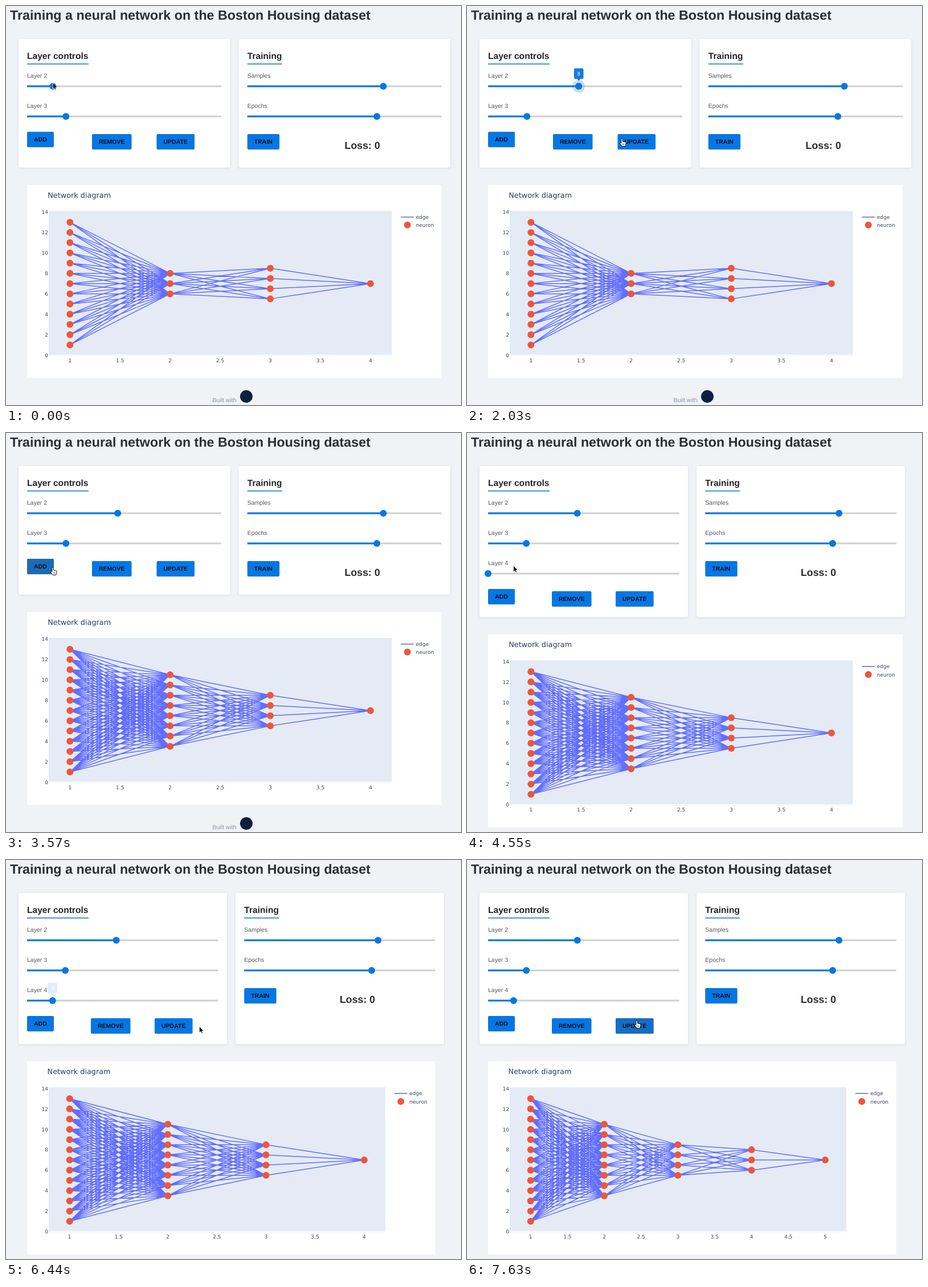
Write an HTML page that moves like this. It is 799 px wide and 701 px high and loops after 8 s.

```html
<!DOCTYPE html>
<html lang="en">
<head>
<meta charset="utf-8">
<title>Training a neural network</title>
<style>
html, body { margin: 0; width: 100%; height: 100%; overflow: hidden; background: #f1f2f6; }
svg { display: block; width: 799px; height: 701px; font: 10.5px "Liberation Sans", Arial, sans-serif; text-rendering: geometricPrecision; }
.card { fill: #fff; filter: drop-shadow(0 1px 2px rgba(60, 70, 100, .13)); }
.title { font-size: 23.3px; font-weight: bold; fill: #2d2e32; }
.head { font-size: 15.6px; font-weight: bold; fill: #232427; }
.label { fill: #55585d; }
.btn { font-weight: bold; fill: #06101f; }
.loss { font-size: 17.8px; font-weight: bold; fill: #2a2b2e; }
.tip { font-size: 9px; fill: #fff; text-anchor: middle; }
.foot { fill: #8c94a3; }
.plot text { font: 9px "DejaVu Sans", Verdana, sans-serif; fill: #3a4660; }
.plot .name { font-size: 12.83px; fill: #2a3f5f; }
.edges { stroke: #636efa; stroke-width: 1.5; fill: none; }
</style>
</head>
<body>
<svg viewBox="0 0 799 701">
  <rect width="799" height="701" fill="#f1f2f6"/>
  <text class="title" x="7" y="24">Training a neural network on the Boston Housing dataset</text>
  <g id="panel"></g>
  <g id="plot" class="plot"></g>
  <g id="cursor"></g>
</svg>
<script>
const LOOP = 8000, STEP = 70;
const BLUE = '#0577e3';
const ADD_LAYER = 4480, RESIZE = 4830;

// time, x, y, shape; a shape holds until the next row
const cursorKeys = [
  [0, 82.5, 134.8, 'arrow'],
  [210, 82.5, 141, 'grab'],
  [1400, 82.5, 141, 'grab'],
  [1820, 196, 141, 'grab'],
  [1890, 212, 168, 'arrow'],
  [2030, 272, 233, 'hand'],
  [2240, 298, 236, 'hand'],
  [3080, 298, 236, 'hand'],
  [3150, 270, 252, 'arrow'],
  [3430, 86, 238, 'hand'],
  [3570, 82, 236, 'hand'],
  [3920, 82, 236, 'hand'],
  [4200, 81.5, 233, 'hand'],
  [ADD_LAYER, 81.5, 233, 'arrow'],
  [5320, 81.5, 233, 'arrow'],
  [5460, 85, 242, 'grab'],
  [5600, 87, 247, 'grab'],
  [6160, 87, 247, 'grab'],
  [6230, 128, 259, 'arrow'],
  [6440, 339.5, 292.5, 'arrow'],
  [6580, 339.5, 292.5, 'arrow'],
  [6860, 304, 264, 'arrow'],
  [7000, 301, 271, 'arrow'],
  [7070, 299, 279, 'hand'],
  [7140, 298, 282, 'hand'],
  [LOOP, 298, 282, 'hand']
];

const shapes = {
  arrow: '<path d="M0 0V11L2.6 8.7 4.3 12.5 6 11.8 4.4 8.1H7.8Z" fill="#000" stroke="#fff" stroke-width=".8"/>',
  hand: '<path d="M-1.2 8V1.2a1.3 1.3 0 0 1 2.6 0V5l4.3.8q1.6.4 1.5 2l-.6 3.2-1 2.6H.2L-3.6 8.6q-.6-1.4 1-1.3Z" fill="#fff" stroke="#111"/>' +
    '<path d="M1.8 8.5v3M3.7 8.5v3" stroke="#111" stroke-width=".7"/>',
  grab: '<path d="M-4 1V-3.5a1.2 1.2 0 0 1 2.3 0V-5A1.2 1.2 0 0 1 .6-5v.7a1.2 1.2 0 0 1 2.3 0v1.5a1.1 1.1 0 0 1 2.2 0V1.5L4 5.5H-2.5L-5.6 1.2q-.5-1.4 1.6-.2Z" fill="#fff" stroke="#111"/>' +
    '<path d="M-1.7-4V-.5M.6-4.5V-.5M2.9-3.5V-.5" stroke="#111" stroke-width=".7"/>'
};

const $ = id => document.getElementById(id);
const lerp = (a, b, p) => a + (b - a) * p;
const ramp = (t, a, b) => Math.min(1, Math.max(0, (t - a) / (b - a)));
const smooth = p => p * p * (3 - 2 * p);
const text = (cls, x, y, s, more = '') => `<text class="${cls}" x="${x}" y="${y}" ${more}>${s}</text>`;
const rect = (x, y, w, h, more) => `<rect x="${x}" y="${y}" width="${w}" height="${h}" ${more}/>`;
const dot = (x, y, r, fill) => `<circle cx="${x}" cy="${y}" r="${r}" fill="${fill}"/>`;

function put(id, html) {
  const el = $(id);
  if (el.last !== html) el.innerHTML = el.last = html;
}

function slider(x, w, y, p, label) {
  const at = x + w * p;
  return text('label', x, y - 14.8, label) +
    rect(x, y - 1.5, w, 3, 'rx="1" fill="#cfd0d2"') +
    rect(x, y - 1.5, w * p, 3, `fill="${BLUE}"`) + dot(at, y, 6, BLUE);
}

function tooltip(x, y, value, alpha) {
  if (alpha <= 0) return '';
  return `<g opacity="${alpha}" transform="translate(${x} ${y})">` +
    dot(0, 0, 11, 'rgba(70,110,200,.25)') + dot(0, 0, 6, BLUE) +
    `<path d="M-6.3-31.5H6.3q2 0 2 2v14.5q0 2-2 2H3L0-9.5-3-13H-6.3q-2 0-2-2V-29.5q0-2 2-2Z" fill="#147ae0"/>` +
    text('tip', 0, -18.6, value) + '</g>';
}

function button(x, y, w, label, hover = 0, press = 0) {
  const ripple = press > 0 && press < 1
    ? rect(x, y, w, 27, `rx="2" fill="#000" opacity="${.12 * (1 - press)}"`) : '';
  return rect(x, y + 1, w, 27, 'rx="2" fill="#000" opacity=".1"') +
    rect(x, y, w, 27, `rx="2" fill="${BLUE}"`) +
    rect(x, y, w, 27, `rx="2" fill="#2366ac" opacity="${hover}"`) + ripple +
    text('btn', x + 12, y + 17.2, label);
}

function heading(x, w, label) {
  return text('head', x, 92.6, label) + rect(x, 101, w, 1.6, 'fill="#1a80cb"');
}

function drawPanel(t) {
  const late = t >= ADD_LAYER;
  const cardW = late ? 366 : 371.5, cardH = late ? 265.5 : 226;
  const trackW = cardW - 30.3, right = late ? 403 : 408.5, rx = right + 15.3;
  const by = late ? 274 : 221;
  const second = lerp(2, 7, smooth(ramp(t, 1400, 1820)));
  const fourth = 2 * smooth(ramp(t, 5740, 6020));
  const addHover = late ? 0 : .8 * ramp(t, 3360, 3570);
  const updHover = t < 3150 ? .55 * ramp(t, 2030, 2310) : late ? .55 * ramp(t, 7070, 7280) : .55 * (1 - ramp(t, 3080, 3290));

  let s = rect(22, 58, cardW, cardH, 'rx="3" class="card"') +
    rect(right, 58, cardW, cardH, 'rx="3" class="card"') +
    heading(37, 108, 'Layer controls') + heading(rx, 61, 'Training') +
    slider(37, trackW, 141, second / 15, 'Layer 2') +
    slider(37, trackW, 194, 3 / 15, 'Layer 3');
  if (late) s += slider(37, trackW, 247, fourth / 15, 'Layer 4');
  s += slider(rx, trackW, 141, .7, 'Samples') + slider(rx, trackW, 194, 2 / 3, 'Epochs') +
    button(37, by, 47, 'ADD', addHover, ramp(t, 3850, 4270)) +
    button(late ? 149 : 151, by + 4, 69.5, 'REMOVE') +
    button(late ? 261 : 264.5, by + 4, 66.6, 'UPDATE', updHover, ramp(t, late ? 7140 : 2450, late ? 7350 : 2870)) +
    button(rx, 225, 56.4, 'TRAIN') +
    text('loss', late ? 586 : 594.6, 251, 'Loss: 0');

  if (t >= 1400 && t < 2500)
    s += tooltip(37 + trackW * second / 15, 141, Math.round(second) + 1, 1 - ramp(t, 2170, 2450));
  if (t >= 5670 && t < 6500)
    s += tooltip(37 + trackW * fourth / 15, 247, Math.round(fourth) + 1, 1 - ramp(t, 6195, 6475));
  if (!late) s += text('foot', 362.5, 695.5, 'Built with') + dot(422, 686, 11, '#0b1f3f');
  put('panel', s);
}

function drawPlot(t) {
  const late = t >= ADD_LAYER, narrow = t >= RESIZE;
  const layers = t < 3080 ? [13, 3, 4, 1] : t < 7560 ? [13, 8, 4, 1] : [13, 8, 4, 3, 1];
  const key = [late, narrow, layers].join();
  if ($('plot').key === key) return;
  $('plot').key = key;

  const dy = late ? 39.4 : 0, dx = narrow ? -11.5 : 0;
  const x1 = narrow ? 111.7 : 112.3, xn = narrow ? 629 : 640;
  const n = layers.length;
  const px = v => x1 + (xn - x1) * (v - 1) / (n - 1);
  const py = v => 613.4 + dy - 17.96 * v;
  const nodes = layers.map((count, l) =>
    Array.from({ length: count }, (_, i) => [px(l + 1), py(7 + i - (count - 1) / 2)]));

  let s = rect(37, 314.4 + dy, 728 + dx, 339, 'fill="#fff"') +
    rect(75, 360 + dy, 602.6 + dx, 254.8, 'fill="#e4ebf5"') +
    rect(75, 612.6 + dy, 602.6 + dx, 1.5, 'fill="#fff"') +
    text('name', narrow ? 72.6 : 73.2, 337 + dy, 'Network diagram');
  for (let v = 0; v <= 14; v += 2) s += text('', 74, py(v) + 3.3, v, 'text-anchor="end"');
  for (let v = 1; v <= n; v += .5) s += text('', px(v), 626 + dy, v, 'text-anchor="middle"');

  let d = '';
  for (let l = 0; l < n - 1; l++)
    for (const a of nodes[l]) for (const b of nodes[l + 1]) d += `M${a}L${b}`;
  s += `<path class="edges" d="${d}"/>` + nodes.flat().map(p => dot(...p, 6, '#ef553b')).join('');

  s += rect(693.5 + dx, 370 + dy, 22.5, 1.6, `fill="${late ? '#636efa' : '#6f79b3'}"`) +
    dot(704.8 + dx, 384.8 + dy, 6, '#ef553b') +
    text('', 719.8 + dx, 374 + dy, 'edge') + text('', 719.8 + dx, 388.2 + dy, 'neuron');
  put('plot', s);
}

function drawCursor(t) {
  const i = cursorKeys.findIndex(k => k[0] > t) - 1;
  const a = cursorKeys[i], b = cursorKeys[i + 1];
  const p = ramp(t, a[0], b[0]);
  // the first row is a hard change; the drag follows the thumb
  const q = i === 0 ? 0 : b[0] === 1820 ? smooth(p) : p;
  put('cursor', shapes[a[3]]);
  $('cursor').setAttribute('transform', `translate(${lerp(a[1], b[1], q)} ${lerp(a[2], b[2], q)})`);
}

const start = performance.now();
function frame() {
  const now = (performance.now() - start) % LOOP;
  const t = Math.floor(now / STEP) * STEP;
  drawPanel(t);
  drawPlot(t);
  drawCursor(t);
  requestAnimationFrame(frame);
}
frame();
</script>
</body>
</html>
```
